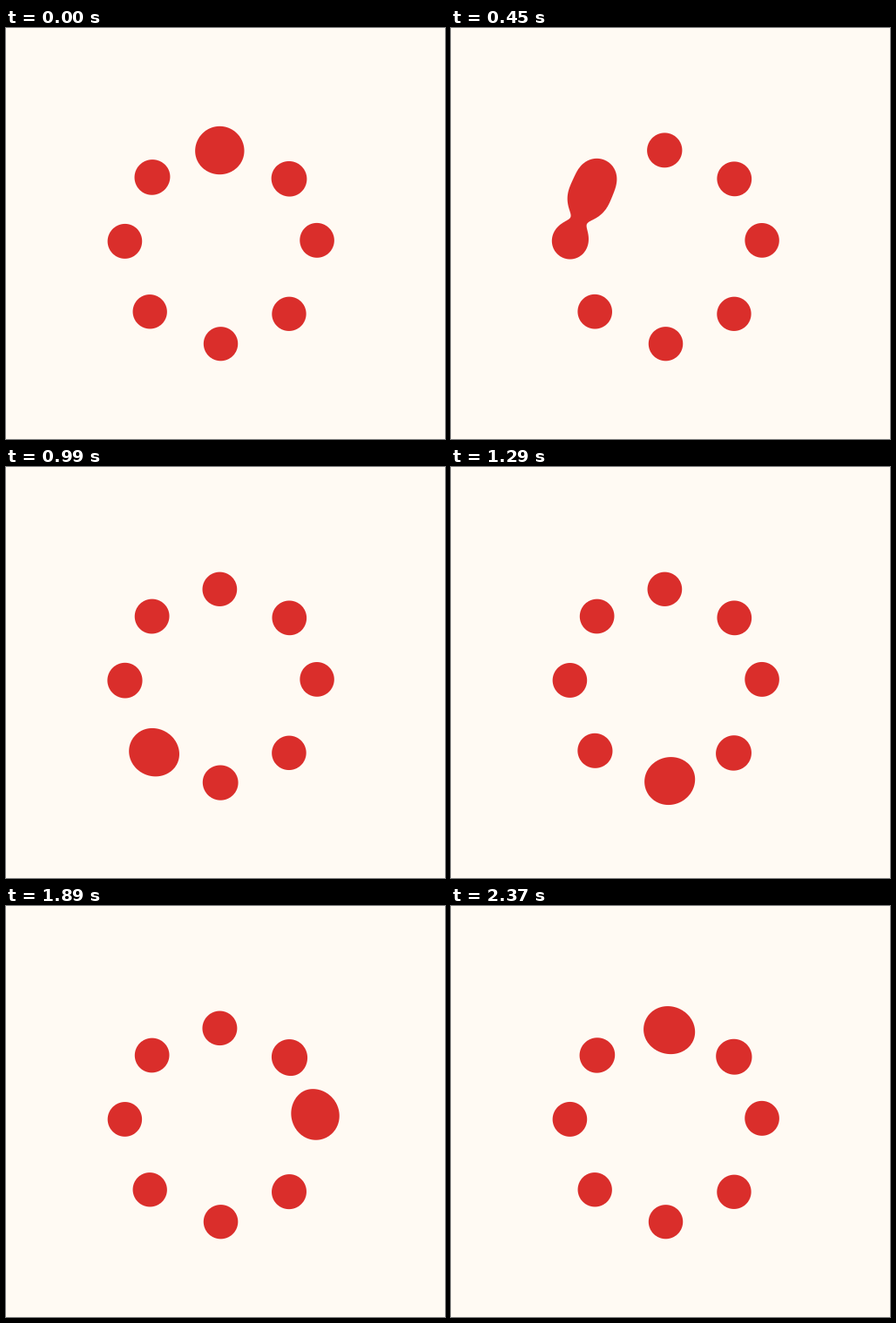
An HTML page with a canvas that plays this animation: 504x472 px, repeating every 2.4 s.

```html
<!DOCTYPE html>
<html lang="en">
<head>
<meta charset="utf-8">
<title>Metaball loader</title>
<style>
  html, body { margin: 0; width: 100%; height: 100%; overflow: hidden; background: #fffaf3; }
  canvas { display: block; }
</style>
</head>
<body>
<canvas id="stage" width="504" height="472"></canvas>
<script>
const ctx = document.getElementById('stage').getContext('2d');
const BACK = [255, 250, 243], RED = [218, 46, 43];
const STEP = 30, STEPS = 80;
const REACH = 18.15;                       // radius of a lone ball
const BOX = { x: 96, y: 100, w: 300, h: 304 };

// Counter-clockwise from the top
const dots = [
  [245.4, 140], [167.4, 171.2], [136.1, 245], [165, 326],
  [246.5, 363], [325.2, 328.5], [357.4, 244], [325.5, 173]
];

// The resting dots give a fixed inverse-square field and slope
const size = BOX.w * BOX.h;
const field = new Float64Array(size);
const slopeX = new Float64Array(size);
const slopeY = new Float64Array(size);

function eachPixel(visit) {
  for (let row = 0, i = 0; row < BOX.h; row++)
    for (let col = 0; col < BOX.w; col++, i++)
      visit(i, BOX.x + col + 0.5, BOX.y + row + 0.5);
}

eachPixel((i, x, y) => {
  for (const [cx, cy] of dots) {
    const dx = x - cx, dy = y - cy;
    const f = 1 / (dx * dx + dy * dy + 1e-6);
    field[i] += f;
    slopeX[i] += dx * f * f;
    slopeY[i] += dy * f * f;
  }
});

// The runner follows the chords, resting briefly on each dot
function runnerAt(step) {
  const leg = step < 12 ? 0 : Math.min(7, Math.floor((step - 2) / 10));
  const leave = leg ? leg * 10 + 2 : 0;
  const arrive = leg === 7 ? STEPS : leg * 10 + 11;
  let p = Math.min(1, (step - leave) / (arrive - leave));
  if (!leg) p = Math.pow(p, 1.4);
  const [ax, ay] = dots[leg], [bx, by] = dots[(leg + 1) % 8];
  return [ax + (bx - ax) * p, ay + (by - ay) * p];
}

const image = ctx.createImageData(BOX.w, BOX.h);

function draw(step) {
  const [cx, cy] = runnerAt(step);
  const px = image.data;
  eachPixel((i, x, y) => {
    const dx = x - cx, dy = y - cy;
    const f = 1 / (dx * dx + dy * dy + 1e-6);
    const sum = field[i] + f, root = Math.sqrt(sum);
    const gx = slopeX[i] + dx * f * f, gy = slopeY[i] + dy * f * f;
    // Signed distance to the outline, for smooth edges
    const depth = (REACH - 1 / root) * sum * root / (Math.sqrt(gx * gx + gy * gy) + 1e-12);
    const cover = Math.max(0, Math.min(1, depth + 0.5));
    const o = i * 4;
    for (let c = 0; c < 3; c++) px[o + c] = BACK[c] + (RED[c] - BACK[c]) * cover;
    px[o + 3] = 255;
  });
  ctx.putImageData(image, BOX.x, BOX.y);
}

ctx.fillStyle = '#fffaf3';
ctx.fillRect(0, 0, 504, 472);

let shown = -1;
const start = performance.now();
function tick() {
  const step = Math.floor((performance.now() - start) / STEP) % STEPS;
  if (step !== shown) draw(shown = step);
  requestAnimationFrame(tick);
}
tick();
</script>
</body>
</html>
```
